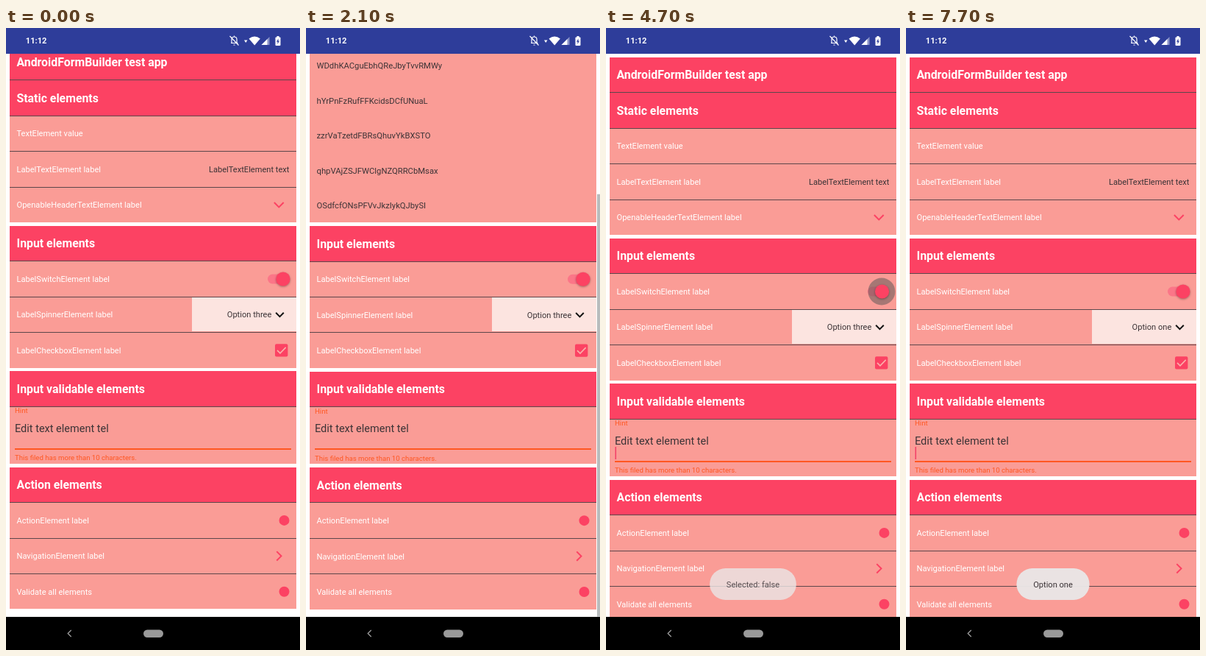
These frames come from a looping animation (400x845 px, 8000 ms). An HTML page with a canvas:

```html
<!DOCTYPE html>
<html lang="en">
<head>
<meta charset="utf-8">
<title>Form demo</title>
<style>
  html, body { margin: 0; width: 100%; height: 100%; overflow: hidden; background: #fff; }
  canvas { display: block; width: 400px; height: 845px; }
</style>
</head>
<body>
<canvas id="stage" width="400" height="845"></canvas>
<script>
const c = document.getElementById('stage').getContext('2d');
const LOOP = 8000, STEP = 100;
const RED = '#fc4263', PINK = '#fa9c96', DARK = '#3b3336', ORANGE = '#ff5722', BLUE = '#2e3d9a';

// Layout: rows with a divider between them, stacked in cards.
const TOP = 35, BOTTOM = 800, VIEW = BOTTOM - TOP;
const GAP = 4.87, ITEM = 47.45, PITCH = ITEM + .97, EDIT = 78;
const strings = ['WDdhKACguEbhQReJbyTvvRMWy', 'hYrPnFzRufFFKcidsDCfUNuaL', 'zzrVaTzetdFBRsQhuvYkBXSTO',
  'qhpVAjZSJFWClgNZQRRCbMsax', 'OSdfcfONsPFVvJkzIykQJbySI'];
const options = ['Option one', 'Option two', 'Option four', 'Option five'];
const EXTRA = strings.length * ITEM;

// Smooth 0 to 1 from a given time.
function ramp(t, from, length = 200) {
  const k = Math.min(1, Math.max(0, (t - from) / length));
  return k * k * (3 - 2 * k);
}

// Fades in at one time and out at another.
function pulse(t, from, to, fade = 200) {
  return ramp(t, from, fade) - ramp(t, to, fade);
}

function rect(x, y, w, h, color, r = 0) {
  c.fillStyle = color;
  c.beginPath();
  c.roundRect(x, y, w, h, r);
  c.fill();
}

// A full-width band with edges on whole pixels.
function band(y, h, color) {
  const top = Math.round(y);
  rect(5, top, 390, Math.round(y + h) - top, color);
}

function disc(x, y, r, color) {
  c.fillStyle = color;
  c.beginPath();
  c.arc(x, y, r, 0, 7);
  c.fill();
}

function path(d, color, width) {
  const p = new Path2D(d);
  c.fillStyle = c.strokeStyle = color;
  c.lineWidth = width;
  if (width) c.stroke(p); else c.fill(p);
}

// Points down when turn is 0; turn counts quarter turns clockwise.
function chevron(x, y, turn, r, color, width = 2) {
  c.save();
  c.translate(x, y);
  c.rotate(turn * Math.PI / 2);
  path(`M${-r} ${-r / 2}L0 ${r / 2}L${r} ${-r / 2}`, color, width);
  c.restore();
}

// Text is centred on y by its capital height.
function text(s, x, y, { size = 11.1, color = '#fff', weight = 400, align = 'left' } = {}) {
  c.font = `${weight} ${size}px Roboto, sans-serif`;
  c.fillStyle = color;
  c.textAlign = align;
  c.fillText(s, x, y + size * .355);
}

function shadow(blur, dy, alpha, drawShape) {
  c.save();
  c.shadowColor = `rgba(0,0,0,${alpha})`;
  c.shadowBlur = blur;
  c.shadowOffsetY = dy;
  drawShape();
  c.restore();
}

function header(y, title) {
  band(y, ITEM, RED);
  text(title, 14.5, y + 24, { size: 15.85, weight: 700 });
}

// Draws a card with its title and labels, and returns the top of the next one.
function card(y, title, labels, extra = 0) {
  const h = (labels.length + 1) * PITCH - .97 + extra;
  band(y, h, PINK);
  header(y, title);
  labels.forEach((label, i) => {
    const top = y + (i + 1) * PITCH;
    text(label, 14.5, top + ITEM / 2);
    band(top - .97, 1, '#5c474b');
  });
  return y + h + GAP;
}

function staticCard(y, open) {
  const next = card(y, 'AndroidFormBuilder test app',
    ['', 'TextElement value', 'LabelTextElement label', 'OpenableHeaderTextElement label'], open ? EXTRA : 0);
  header(y + PITCH, 'Static elements');
  text('LabelTextElement text', 385.5, y + 3.5 * PITCH - .5, { color: DARK, align: 'right' });
  chevron(371.3, y + 4.5 * PITCH - .5, open ? 2 : 0, 6.4, RED);
  if (open) {
    strings.forEach((s, i) => text(s, 14.5, y + 5 * PITCH + (i + .5) * ITEM - .5, { size: 11.25, color: DARK }));
  }
  return next;
}

function inputCard(y, t) {
  const next = card(y, 'Input elements',
    ['LabelSwitchElement label', 'LabelSpinnerElement label', 'LabelCheckboxElement label']);
  const mid = i => y + i * PITCH + ITEM / 2;

  const on = 1 - ramp(t, 3700) + ramp(t, 4500, 250);
  const ripple = pulse(t, 3500, 3800) + pulse(t, 4400, 4800);
  rect(356, mid(1) - 6.5, 28, 13, on > .5 ? '#fb7688' : '#c2807d', 6.5);
  disc(375, mid(1), 18.5, `rgba(85,85,85,${ripple / 2})`);
  shadow(3, 1, .35, () => disc(363 + 14 * on, mid(1), 9.6, on > .5 ? RED : '#f5f0f0'));

  rect(253, Math.round(y + 2 * PITCH), 142, 46, '#fce4e0');
  text(t < 6600 ? 'Option three' : options[0], 361.3, mid(2), { color: DARK, align: 'right' });
  chevron(372.5, mid(2), 0, 5.3, '#111');

  rect(366, mid(3) - 8.7, 17.4, 17.4, RED, 2);
  const v = mid(3);
  path(`M369 ${v}l4 4l7.7 -8`, '#fbb0aa', 1.6);
  return next;
}

function editCard(y, t) {
  const next = card(y, 'Input validable elements', [], EDIT);
  band(y + ITEM, 1, '#5c474b');
  text('Hint', 12, y + 53.5, { size: 9.6, color: ORANGE });
  text('Edit text element tel', 12, y + 77, { size: 14.5, color: DARK });
  const blink = (t + 700) % 1000 < 550;
  const hidden = t < 1300 || (t > 3000 && t < 3500);
  if (!hidden && (blink || t > 7300)) rect(12.5, y + 85.5, 1.3, 17, '#f0305f');
  rect(12, Math.round(y + 104.4), 376, 2, ORANGE);
  text('This filed has more than 10 characters.', 12, y + 117.5, { size: 9.6, color: ORANGE });
  return next;
}

function actionCard(y) {
  card(y, 'Action elements', ['ActionElement label', 'NavigationElement label', 'Validate all elements']);
  const mid = y + ITEM / 2;
  disc(378.5, mid + PITCH, 7, RED);
  chevron(371.4, mid + 2 * PITCH, 3, 6.2, RED);
  disc(378.5, mid + 3 * PITCH, 7, RED);
}

function scrollbar(scroll, open, alpha) {
  const scale = VIEW / (VIEW + 17 + (open ? EXTRA : 0));
  rect(396, TOP + scroll * scale, 4, VIEW * scale, `rgba(70,80,82,${.38 * alpha})`);
}

function menu(k) {
  if (!k) return;
  c.save();
  c.globalAlpha = k;
  shadow(6, 2, .4, () => rect(253, 429.5, 142, 156.5 * k, '#fff'));
  c.beginPath();
  c.rect(253, 429, 142, 157 * k);
  c.clip();
  options.forEach((s, i) => text(s, 384, 449.5 + i * 39.2, { size: 12.3, color: DARK, align: 'right' }));
  c.restore();
}

function toast(s, alpha) {
  if (!alpha) return;
  c.save();
  c.globalAlpha = alpha;
  c.font = '400 11.1px Roboto, sans-serif';
  const w = c.measureText(s).width + 45.5;
  rect(200 - w / 2, 734, w, 43, 'rgba(234,230,230,.96)', 21.5);
  text(s, 200, 756, { color: DARK, align: 'center' });
  c.restore();
}

function touch(t, from, x, y, length = 100) {
  if (t < from || t > from + length) return;
  disc(x, y, 10.3, 'rgba(255,255,255,.66)');
  c.strokeStyle = 'rgba(125,120,120,.3)';
  c.lineWidth = 1.5;
  c.stroke();
}

function touches(t, scroll) {
  const drag = 254 - scroll;
  touch(t, 500, 371, 241);
  touch(t, 1300, 302, 205 + drag * 1.3, 500);
  touch(t, 2200, 302, 250 + drag, 400);
  touch(t, 2800, 368, 250);
  touch(t, 3500, 375, 358);
  touch(t, 5400, 330, 406);
  touch(t, 6300, 364, 442);
}

function statusBar() {
  rect(0, 0, 400, TOP, BLUE);
  text('11:12', 26.8, 17.5, { size: 11.1, weight: 700 });
  // muted bell
  path('M306 20.5h9.5M307 20v-4.5q0-3.5 3.5-3.5t3.5 3.5v4.5M310.5 10.5v1.5M309.5 23h2M304.5 11l12 12.5', '#fff', 1.2);
  // marker, wifi, signal
  path('M324 16.5h4.5l-2.3 3.5z', '#fff');
  path('M330.5 14.5q7.7-6 15.4 0L338.2 23.5z', '#fff');
  path('M347.5 23l11-11v11z', '#8b94c8');
  path('M347.5 23l8-8v8z', '#fff');
  // battery
  rect(366.5, 12.5, 7, 11.5, '#fff', 1);
  rect(368.5, 11, 3, 2, '#fff');
  path('M370.6 14.2l-2.6 4.6h1.6l-.2 3.2l2.6-4.6h-1.6z', BLUE);
}

function navBar() {
  rect(0, BOTTOM, 400, 45, '#000');
  chevron(86.5, 822.5, 1, 4.5, '#999', 1.4);
  rect(187, 817.5, 27, 10.5, '#999', 5.2);
}

function draw(t) {
  const open = t >= 700 && t < 3000;
  const scroll = Math.round(17 + 16 * ramp(t, 700, 300) + 221 * ramp(t, 1300, 500) - 254 * ramp(t, 2200, 400));
  rect(0, 0, 400, 845, '#fff');
  c.save();
  c.translate(0, -scroll);
  let y = staticCard(TOP + GAP, open);
  y = inputCard(y, t);
  y = editCard(y, t);
  actionCard(y);
  c.restore();

  const glow = pulse(t, 1600, 1800);
  disc(250, 1316 + 50 * (1 - glow), 567, `rgba(48,63,159,${.15 * glow})`);
  scrollbar(scroll, open, pulse(t, 700, 2600, 400));
  menu(pulse(t, 5500, 6500));
  toast('Selected: false', pulse(t, 3900, 4650));
  toast('Selected: true', pulse(t, 4900, 6600));
  toast(options[0], ramp(t, 6800));
  touches(t, scroll);
  statusBar();
  navBar();
}

const start = performance.now();
function tick() {
  const t = (performance.now() - start) % LOOP;
  draw(Math.floor(t / STEP) * STEP);
  requestAnimationFrame(tick);
}
tick();
</script>
</body>
</html>
```
